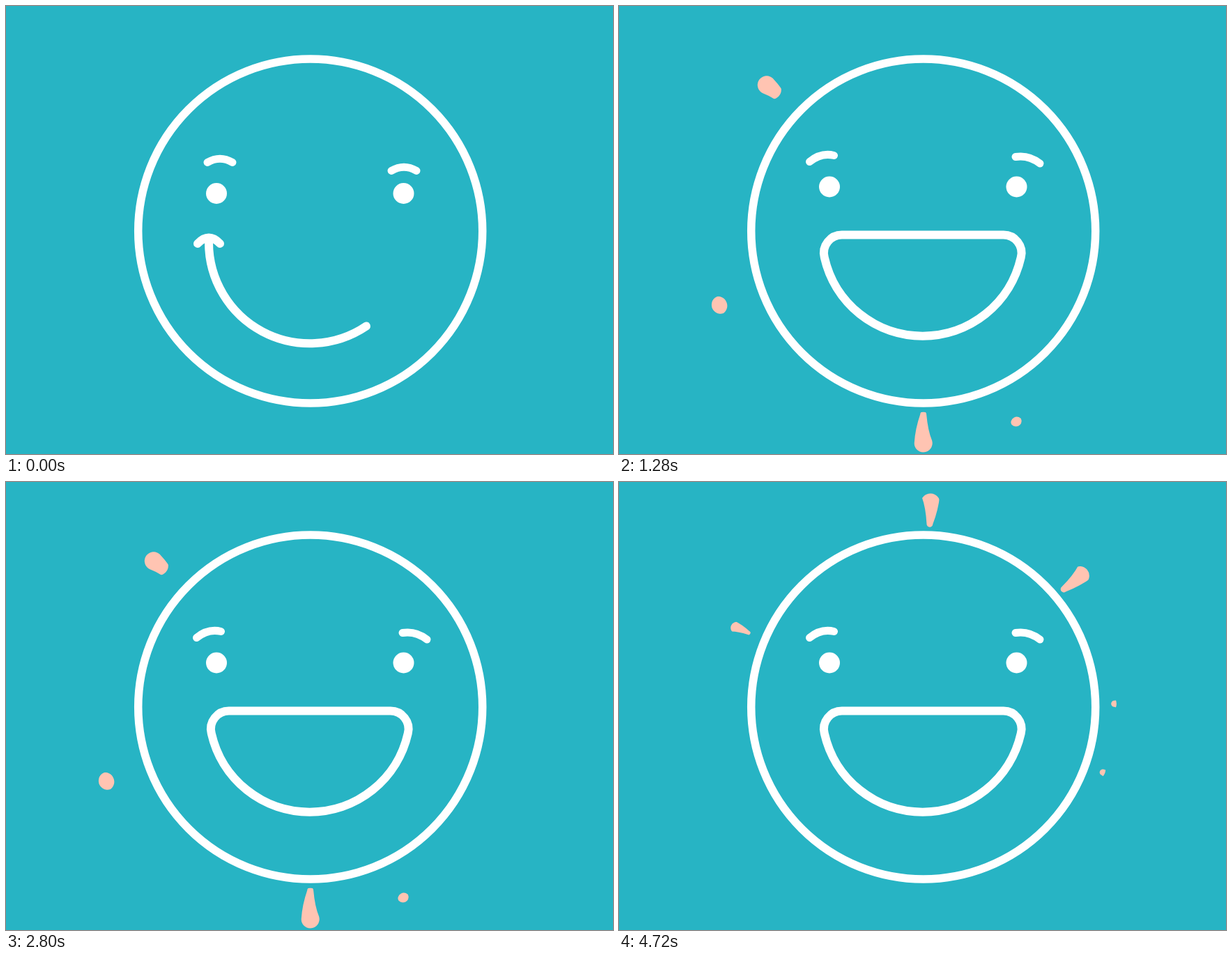
An HTML page with a canvas for the animation above (4800 ms loop, 871 by 643 pixels).

```html
<!DOCTYPE html>
<html lang="en">
<head>
<meta charset="utf-8">
<title>Laughing face</title>
<style>
  html, body { margin: 0; height: 100%; overflow: hidden; background: #27b4c4; }
  canvas { display: block; }
</style>
</head>
<body>
<canvas id="stage" width="871" height="643"></canvas>
<script>
const ctx = document.getElementById('stage').getContext('2d');
const LOOP = 4800, STEP = 80, BURST = 1520;
const GROW = 220, HOLD = 300, LIFE = 540;
const CX = 436.7, CY = 323, RADIUS = 247;
const LENGTH = 59, HEAD = 13, CAP = 13.6;
const BIG = 1, MEDIUM = 0.8, SMALL = 0.62, TINY = 0.4;

// Rays of one burst: start time, distance of the middle from the centre, [degrees, size]...
const waves = [
  [0, 288, [-88, BIG], [-40, BIG], [-157, SMALL]],
  [110, 299, [-1, BIG], [20, BIG]],
  [170, 285, [-115, SMALL]],
  [460, 294, [180, BIG], [142, BIG], [122, MEDIUM]],
  [555, 298, [-19, SMALL], [40, BIG]],
  [720, 285, [-61, TINY]],
  [840, 293, [160, BIG], [64, SMALL]],
  [880, 291, [-137, BIG]],
  [960, 288, [90, BIG]]
];

const smooth = x => {
  x = Math.min(1, Math.max(0, x));
  return x * x * (3 - 2 * x);
};

// Narrow tip at 0, round head at the far end, slightly bent clockwise
function makeTeardrop() {
  const path = new Path2D(), tip = HEAD * 0.34, x = LENGTH - HEAD, join = -1.9;
  path.arc(tip, 0, tip, Math.PI / 2, Math.PI * 1.5);
  path.quadraticCurveTo(x * 0.6, -HEAD * 0.5, x + HEAD * Math.cos(join), HEAD * Math.sin(join));
  path.arc(x, 0, HEAD, join, Math.PI / 2);
  path.quadraticCurveTo(x * 0.55, HEAD * 0.9, tip, tip);
  return path;
}
const teardrop = makeTeardrop();

// A round-capped stroke sweeps through the teardrop and reveals it
function drawRay(degrees, size, distance, age) {
  const front = smooth(age / GROW), back = smooth((age - HOLD) / (LIFE - HOLD));
  ctx.save();
  ctx.translate(CX, CY);
  ctx.rotate(degrees * Math.PI / 180);
  ctx.translate(distance - size * LENGTH / 2, 0);
  ctx.scale(size, size);
  ctx.clip(teardrop);
  ctx.beginPath();
  ctx.moveTo(back > 0 ? back * LENGTH + CAP : -2 * CAP, 0);
  ctx.lineTo(front < 1 ? front * LENGTH - CAP : LENGTH + 2 * CAP, 0);
  ctx.lineWidth = 2 * CAP;
  ctx.stroke();
  ctx.restore();
}

function drawRays(phase) {
  for (const [start, distance, ...rays] of waves) {
    const age = phase - start;
    if (age <= 0 || age >= LIFE) continue;
    for (const [degrees, size] of rays) drawRay(degrees, size, distance, age);
  }
}

function line(path, width = 12) {
  ctx.lineWidth = width;
  ctx.stroke(new Path2D(path));
}

function circle(x, y, r) {
  ctx.beginPath();
  ctx.arc(x, y, r, 0, Math.PI * 2);
}

function drawEyes(y) {
  for (const x of [302, 570.5]) {
    circle(x, y, 15);
    ctx.fill();
  }
}

const brow = (x, y) => line(`M${x - 18} ${y} q18 -10.5 36 0`, 11);
const cheek = x => line(`M${x - 16} 341 q16 -17 32 0`);

function drawSmile(done) {
  drawEyes(269);
  brow(307, 224.5);
  brow(571, done ? 224.5 : 236.5);
  cheek(291);
  if (done) cheek(581);
  line('M291 335 V339 A145 145 0 0 0 ' + (done ? '581 339 V335' : '517 459.5'));
}

function drawLaugh() {
  drawEyes(259.5);
  line('M273.5 223.5 Q290 210 308.5 214.5', 11);
  line('M569 216.5 Q588 213.5 604 226', 11);
  line('M320.5 328.5 H551 A26 26 0 0 1 576.7 361 A144.5 144.5 0 0 1 294.8 361 A26 26 0 0 1 320.5 328.5 Z');
}

function draw(now) {
  const t = Math.floor(now % LOOP / STEP) * STEP;
  ctx.fillStyle = '#27b4c4';
  ctx.fillRect(0, 0, 871, 643);
  ctx.lineCap = ctx.lineJoin = 'round';

  ctx.strokeStyle = '#ffc4b2';
  drawRays(t % BURST);

  ctx.fillStyle = ctx.strokeStyle = '#fff';
  circle(CX, CY, RADIUS);
  ctx.lineWidth = 11.5;
  ctx.stroke();
  if (t < 2 * STEP) drawSmile(t > 0);
  else drawLaugh();
  requestAnimationFrame(draw);
}
draw(0);
</script>
</body>
</html>
```
